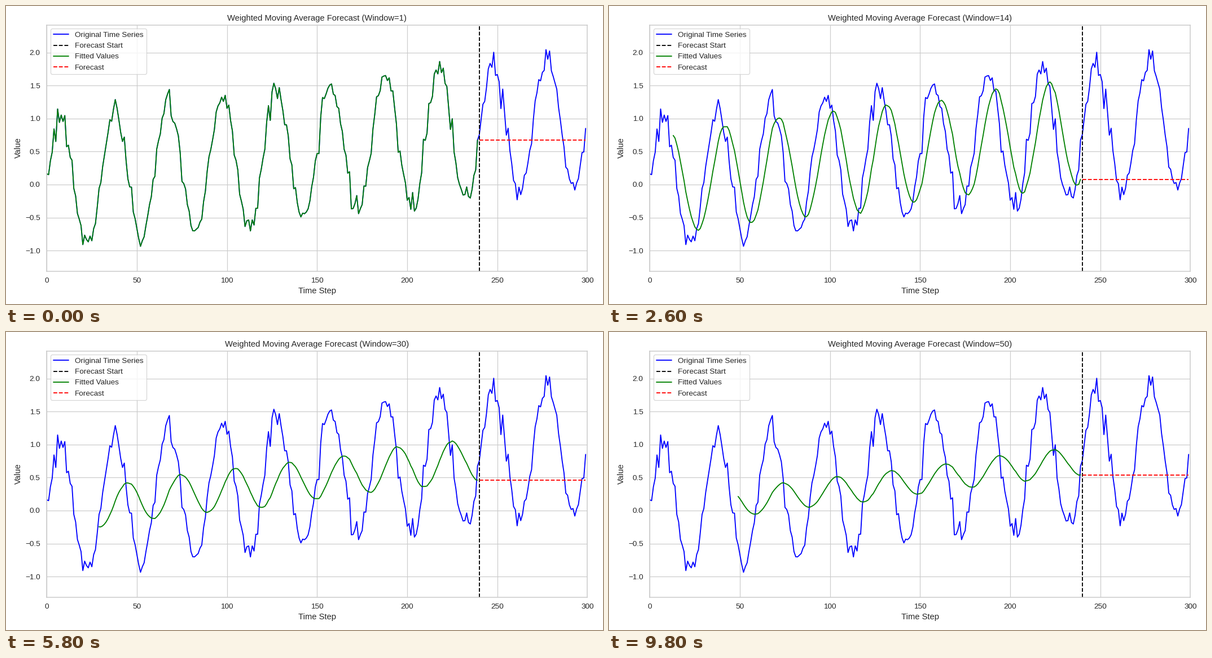
A matplotlib script for the animation above (10000 ms loop, 1058 by 529 pixels).

```python
import numpy as np
import matplotlib.pyplot as plt
from matplotlib.animation import FuncAnimation

W, H = 1058, 529
N, SPLIT = 300, 240
MAX_WINDOW = 50
INK, RULE = "0.15", "0.8"

plt.rcParams.update({
    "font.family": "Liberation Sans",
    "font.size": 12,
    "axes.titlesize": 12,
    "axes.labelsize": 12,
    "xtick.labelsize": 11,
    "ytick.labelsize": 11,
    "legend.fontsize": 11,
    "text.color": INK,
    "axes.labelcolor": INK,
    "xtick.color": INK,
    "ytick.color": INK,
    "axes.edgecolor": RULE,
    "axes.linewidth": 1.25,
    "axes.grid": True,
    "axes.axisbelow": True,
    "grid.color": RULE,
    "grid.linewidth": 1,
    "lines.linewidth": 1.5,
    "lines.solid_capstyle": "round",
    "xtick.major.size": 6,
    "ytick.major.size": 6,
    "xtick.bottom": False,
    "ytick.left": False,
})

# Rising trend, a 30-step season and seeded noise
np.random.seed(1)
t = np.arange(N)
series = np.linspace(0, 1, N) + np.sin(2 * np.pi * t / 30)
series += np.random.normal(0, 0.1, N)
train = series[:SPLIT]


def weighted_average(values, window):
    """Moving average whose newest value weighs the most."""
    weights = np.arange(1, window + 1)
    return np.convolve(values, weights[::-1] / weights.sum(), mode="valid")


fig, ax = plt.subplots(figsize=(12, 6), dpi=W / 12)
fig.subplots_adjust(left=72.3 / W, right=1030.4 / W,
                    bottom=1 - 470.5 / H, top=1 - 33.5 / H)

ax.plot(t, series, color="blue", label="Original Time Series")
ax.axvline(SPLIT, color="black", linestyle="--", label="Forecast Start")
fitted, = ax.plot([], [], color="green", label="Fitted Values")
forecast, = ax.plot([], [], color="red", linestyle="--", label="Forecast")

pad = series.std() / 2
ax.set_xlim(0, N)
ax.set_ylim(series.min() - pad, series.max() + pad)
ax.set_xlabel("Time Step")
ax.set_ylabel("Value")
title = ax.set_title("")
ax.legend(loc="upper left")


def update(frame):
    window = frame + 1
    fit = weighted_average(train, window)
    fitted.set_data(t[window - 1:SPLIT], fit)
    forecast.set_data(t[SPLIT:], np.full(N - SPLIT, fit[-1]))
    title.set_text(f"Weighted Moving Average Forecast (Window={window})")
    return fitted, forecast, title


anim = FuncAnimation(fig, update, frames=MAX_WINDOW, interval=200,
                     repeat=True, repeat_delay=0, blit=False)
plt.show()
```
